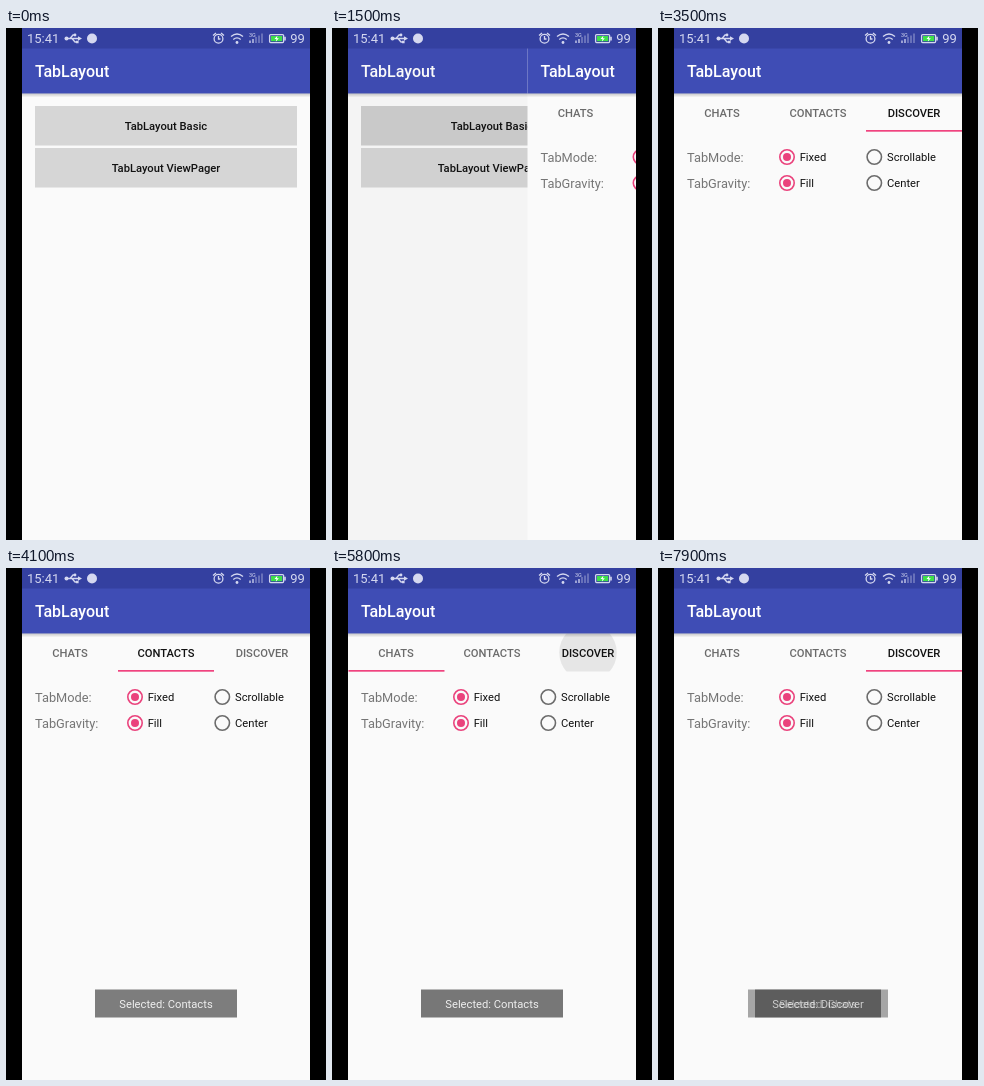
These frames come from a looping animation (320 px wide and 512 px high, 8000 ms). An HTML page:

```html
<!DOCTYPE html>
<html lang="en">
<head>
<meta charset="utf-8">
<title>Tabs demo</title>
<style>
  html, body { margin: 0; height: 100%; overflow: hidden; background: #000; }
  svg { display: block; }
  text { font: 11.2px Roboto, sans-serif; fill: #111; }
  .mid { text-anchor: middle; }
  .medium { font-weight: 500; }
  .title { font-size: 16px; font-weight: 500; fill: #fff; }
  .label { font-size: 12.8px; fill: #757575; }
  .status text { font-size: 13px; fill: #d5d8f0; }
  .line { fill: none; stroke: #d5d8f0; stroke-width: 1.3; }
  .toast text { fill: #eee; }
</style>
</head>
<body>
<svg id="stage" width="320" height="512" viewBox="0 0 320 512">
  <defs>
    <linearGradient id="shade" x2="0" y2="1">
      <stop stop-opacity=".2"/>
      <stop offset="1" stop-opacity="0"/>
    </linearGradient>
    <clipPath id="screen"><path d="M16 0H304V512H16Z"/></clipPath>
    <g id="toolbar">
      <rect x="16" y="20" width="288" height="45.5" fill="#3f4db5"/>
      <rect x="16" y="65.5" width="288" height="4" fill="url(#shade)"/>
      <text class="title" x="29" y="49">TabLayout</text>
    </g>
  </defs>

  <g clip-path="url(#screen)">
    <g id="home">
      <rect x="16" width="288" height="512" fill="#fafafa"/>
      <path d="M29 78H291V117.5H29ZM29 120H291V159.5H29Z" fill="#d6d6d6"/>
      <svg x="29" y="78" width="262" height="39.5"><circle id="buttonRipple" cx="131" cy="20"/></svg>
      <text class="mid medium" x="160" y="101.5">TabLayout Basic</text>
      <text class="mid medium" x="160" y="143.5">TabLayout ViewPager</text>
      <use href="#toolbar"/>
      <rect id="dim" x="16" y="20" width="288" height="492"/>
    </g>

    <g id="page">
      <rect x="16" width="288" height="512" fill="#fafafa"/>
      <svg id="tabBox" y="65.5" width="96" height="38"><circle id="tabRipple" cx="48" cy="19"/></svg>
      <g id="tabs"></g>
      <rect id="indicator" y="102" width="96" height="1.7" fill="#f0437f"/>
      <text class="label" x="29" y="133.7">TabMode:</text>
      <text class="label" x="29" y="159.5">TabGravity:</text>
      <g id="radios"></g>
      <use href="#toolbar"/>
    </g>
    <g id="toasts"></g>
  </g>

  <g class="status">
    <rect x="16" width="288" height="20.5" fill="#3440a0"/>
    <text x="21" y="15">15:41</text>
    <path class="line" d="M60 10.5H73M64 10.5L67 7H69M66 10.5L69 14H71"/>
    <g fill="#d5d8f0">
      <circle cx="60.5" cy="10.5" r="2"/>
      <path d="M72 8.2L76 10.5L72 12.8ZM70 12.7H72.6V15.2H70Z"/>
      <circle cx="69" cy="7" r="1.4"/>
      <circle cx="86" cy="10.5" r="5"/>
      <circle cx="231" cy="14.5" r="1.4"/>
    </g>
    <circle class="line" cx="212.5" cy="10.8" r="4.4"/>
    <path class="line" d="M212.5 8V11H214.5M207 7.5L210 5M215 5L218 7.5"/>
    <path class="line" d="M225 8.5Q231 3.5 237 8.5M227.3 11.5Q231 8.3 234.7 11.5"/>
    <text x="243" y="9" style="font-size:5.5px">3G</text>
    <path class="line" d="M244 15V12.5M247 15V11"/>
    <path class="line" d="M250 15V9M253 15V7.5M256 15V5.5" opacity=".5"/>
    <rect class="line" x="263.6" y="6.6" width="14" height="8" rx="1"/>
    <rect x="265" y="8" width="11.2" height="5.2" fill="#3ee04a"/>
    <path d="M278.2 8.8H279.8V12.4H278.2Z" fill="#d5d8f0"/>
    <path d="M271.5 7.5L268.5 11H270.5L269.8 13.8L272.8 10.2H270.8Z" fill="#fff"/>
    <text x="284.3" y="15">99</text>
  </g>
</svg>
<script>
const $ = id => document.getElementById(id);
const set = (el, attrs) => { for (const k in attrs) el.setAttribute(k, attrs[k]); };
const progress = (t, start, length) => Math.min(1, Math.max(0, (t - start) / length));
const easeOut = p => 1 - (1 - p) ** 2;
const tabX = i => 16 + 96 * i;

// Fast-out, slow-in: cubic-bezier(.4, 0, .2, 1)
function standard(p) {
  let lo = 0, hi = 1, u = p;
  for (let i = 0; i < 20; i++) {
    u = (lo + hi) / 2;
    const x = 1.2 * u * (1 - u) ** 2 + .6 * u * u * (1 - u) + u ** 3;
    if (x < p) lo = u; else hi = u;
  }
  return 3 * u * u * (1 - u) + u ** 3;
}

const STEP = 100, LOOP = 8000, FADE = 300, FIRST_TAB = 2;
const taps = [
  { at: 3500, tab: 1 },
  { at: 4600, tab: 0 },
  { at: 5600, tab: 2 },
];
const toasts = [
  { name: "Contacts", width: 142, show: 3860, hide: 5960 },
  { name: "Chats", width: 126, show: 5960, hide: 7780 },
  { name: "Discover", width: 140, show: 7780, hide: LOOP },
];

$("tabs").innerHTML = ["CHATS", "CONTACTS", "DISCOVER"].map((name, i) =>
  `<text class="mid medium" x="${tabX(i) + 48}" y="88.7">${name}</text>`).join("");

const radio = (x, y, name, on) => {
  const color = on ? "#ea427c" : "#6c6c6c";
  return `<circle cx="${x}" cy="${y}" r="7.2" fill="none" stroke="${color}" stroke-width="1.6"/>` +
    (on ? `<circle cx="${x}" cy="${y}" r="4" fill="${color}"/>` : "") +
    `<text x="${x + 12.7}" y="${y + 4}">${name}</text>`;
};
$("radios").innerHTML = radio(129, 129, "Fixed", true) + radio(216.3, 129, "Scrollable") +
  radio(129, 155, "Fill", true) + radio(216.3, 155, "Center");

$("toasts").innerHTML = toasts.map(({ name, width }) =>
  `<g class="toast"><rect x="${160 - width / 2}" y="421.5" width="${width}" height="28" fill-opacity=".52"/>
   <text class="mid" x="160" y="439.8">Selected: ${name}</text></g>`).join("");

function ripple(el, p, reach, strength) {
  set(el, { r: reach * Math.min(1, p * 1.6), opacity: strength * Math.min(1, 2 * (1 - p)) });
}

function draw(t) {
  const slide = easeOut(progress(t, 1420, 380));
  set($("page"), { transform: `translate(${288 * (1 - slide)} 0)` });
  set($("dim"), { opacity: .065 * slide });
  ripple($("buttonRipple"), progress(t, 960, 650), 135, .1);

  let selected = FIRST_TAB, x = tabX(FIRST_TAB), tapped = null;
  for (const tap of taps) {
    if (t >= tap.at) tapped = tap;
    const start = tap.at + 190;
    if (t < start) continue;
    x += (tabX(tap.tab) - x) * standard(progress(t, start, 300));
    selected = tap.tab;
  }
  set($("indicator"), { x });
  [...$("tabs").children].forEach((el, i) => set(el, { "fill-opacity": i === selected ? 1 : .62 }));
  if (tapped) set($("tabBox"), { x: tabX(tapped.tab) });
  ripple($("tabRipple"), tapped ? progress(t, tapped.at, 600) : 1, 54, .08);

  toasts.forEach(({ show, hide }, i) => {
    const opacity = easeOut(progress(t, show, FADE)) * (1 - progress(t, hide, FADE) ** 2);
    set($("toasts").children[i], { opacity });
  });
}

const origin = performance.now();
function tick() {
  const t = (performance.now() - origin) % LOOP;
  draw(Math.floor(t / STEP) * STEP);
  requestAnimationFrame(tick);
}
tick();
</script>
</body>
</html>
```
